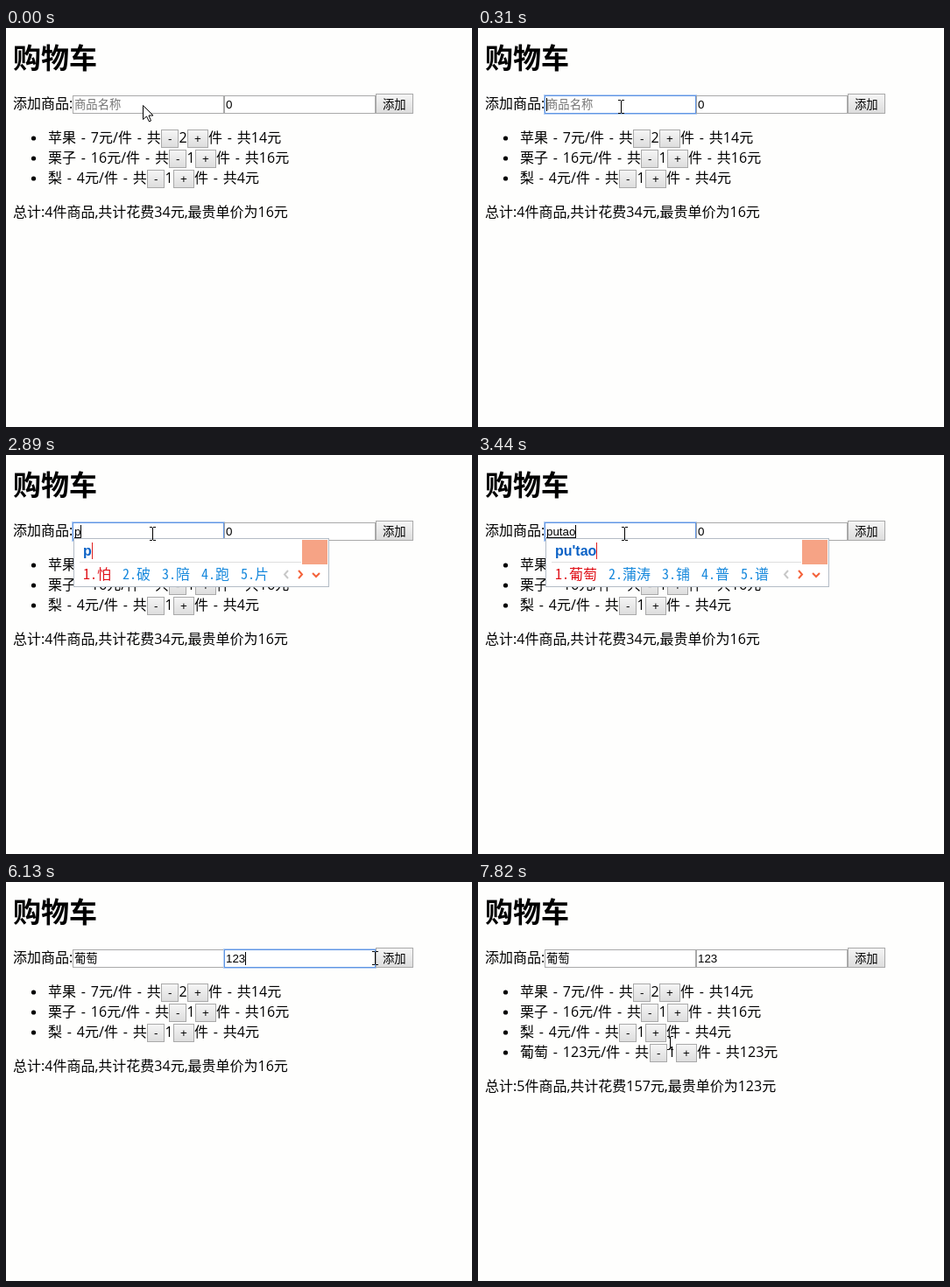
Animation, 532 px wide and 456 px high, one loop 8000 ms. Source, as an HTML page with a canvas:

```html
<!DOCTYPE html>
<html lang="zh-CN">
<head>
<meta charset="utf-8">
<title>购物车</title>
<style>
html, body { margin: 0; width: 100%; height: 100%; overflow: hidden; background: #fefefd; }
canvas { display: block; }
</style>
</head>
<body>
<canvas id="stage" width="532" height="456"></canvas>
<script>
const ctx = document.getElementById('stage').getContext('2d');
const LOOP = 8000;
const PAGE = '16px "Open Sans", "Noto Sans CJK SC", sans-serif';
const FORM = '13.333px "Liberation Sans", "Noto Sans CJK SC", sans-serif';
const MONO = '16px "Noto Sans Mono CJK SC", "Noto Sans CJK SC", monospace';

// name, price, count, x of the minus button
const items = [['苹果', 7, 2, 177], ['栗子', 16, 1, 186], ['梨', 4, 1, 161], ['葡萄', 123, 1, 196]];

// time, x, y of the pointer
const path = [
  [0, 156, 88], [29, 156, 88], [30, 163, 90], [630, 163, 90], [800, 167, 90],
  [4080, 167, 90], [4350, 212, 107], [4640, 263, 91], [4860, 265, 90],
  [5040, 265, 90], [5290, 253, 89], [5960, 253, 89], [6130, 421, 87],
  [6240, 421, 87], [6510, 443, 87], [6850, 443, 87], [7250, 378, 150],
  [7650, 273, 206], [7820, 219, 184], [8000, 219, 184]
];

// start time, typed letters, preedit, candidates, right edge of the popup
const singles = ['扑', '铺', '普', '谱', '葡'];
const pairs = ['普通', '扑通', '葡萄', '蒲团', '铺'];
const compose = [
  [2860, 'p', 'p', ['怕', '破', '陪', '跑', '片'], 369],
  [2910, 'pu', 'pu', singles, 369],
  [3170, 'put', "pu't", pairs, 442],
  [3310, 'puta', "pu'ta", pairs, 442],
  [3380, 'putao', "pu'tao", ['葡萄', '蒲涛', '铺', '普', '谱'], 401]
];

const between = (t, a, b) => t >= a && t < b;

function text(str, x, y, font = PAGE, color = '#000') {
  ctx.font = font;
  ctx.fillStyle = color;
  ctx.fillText(str, x, y);
}

function rect(x, y, w, h, color) {
  ctx.fillStyle = color;
  ctx.fillRect(x, y, w, h);
}

function frame(x, y, w, h, color) {
  ctx.strokeStyle = color;
  ctx.lineWidth = 1;
  ctx.strokeRect(x + .5, y + .5, w - 1, h - 1);
}

function line(points, color, width = 1) {
  ctx.beginPath();
  points.forEach(([x, y]) => ctx.lineTo(x, y));
  ctx.strokeStyle = color;
  ctx.lineWidth = width;
  ctx.stroke();
}

function button(label, x, y, w, h, labelX, pressed) {
  const fill = ctx.createLinearGradient(0, y, 0, y + h);
  fill.addColorStop(pressed ? 1 : 0, '#f6f6f6');
  fill.addColorStop(pressed ? 0 : 1, '#dcdcdc');
  rect(x, y, w, h, fill);
  frame(x, y, w, h, '#a9a9a9');
  text(label, labelX, y + h - 6, FORM);
}

function input(x, focused) {
  rect(x, 77, 173, 21, '#fff');
  frame(x, 77, 173, 21, focused ? '#5f95e4' : '#a9a9a9');
  if (focused) frame(x - 1, 76, 175, 23, '#b4cef3');
}

function row([name, price, count, x], i) {
  const y = 131 + i * 23;
  ctx.beginPath();
  ctx.arc(31.5, y - 5, 2.6, 0, 7);
  ctx.fillStyle = '#000';
  ctx.fill();
  ctx.wordSpacing = '1.7px';
  text(`${name} - ${price}元/件 - 共`, 48, y);
  text(count, x + 20.5, y);
  text(`件 - 共${price * count}元`, x + 54, y);
  ctx.wordSpacing = '0px';
  button('-', x, y - 15, 20, 21, x + 8);
  button('+', x + 30, y - 15, 24, 21, x + 38);
}

function popup(preedit, words, right) {
  rect(77, 95, right - 77, 56, '#fff');
  frame(77, 95, right - 77, 56, '#b4bcc6');
  rect(84, 122, right - 116, 1, '#dedede');
  text(preedit, 88, 115, 'bold 16px "Liberation Sans", sans-serif', '#0c62c6');
  rect(88 + Math.round(ctx.measureText(preedit).width), 100, 1, 19, '#e02020');
  let x = 88;
  words.forEach((word, i) => {
    text(`${i + 1}.${word}`, x, 142, MONO, i ? '#1688dc' : '#e01018');
    x += 29 + word.length * 16;
  });
  const arrow = right - 49;
  line([[arrow + 2, 132], [arrow - 2, 136.5], [arrow + 2, 141]], '#c8c8c8', 2);
  line([[arrow + 14, 132], [arrow + 18, 136.5], [arrow + 14, 141]], '#f4623a', 2);
  line([[arrow + 30, 135], [arrow + 34, 139], [arrow + 38, 135]], '#f4623a', 2);
  rect(right - 31, 97, 29, 28, '#f6a385');
}

function pointer(t) {
  const next = Math.max(1, path.findIndex(p => p[0] > t));
  const [t0, x0, y0] = path[next - 1], [t1, x1, y1] = path[next];
  const k = (t - t0) / (t1 - t0);
  const x = Math.round(x0 + (x1 - x0) * k), y = Math.round(y0 + (y1 - y0) * k);
  const overInput = between(x, 76, 422) && between(y, 77, 98);
  const overList = x < 342 && between(y, 116, 205);
  if (t >= 30 && (overInput || overList)) {
    rect(x, y - 7, 1, 14, '#000');
    for (const edge of [y - 8, y + 7]) {
      rect(x - 3, edge, 3, 1, '#000');
      rect(x + 1, edge, 3, 1, '#000');
    }
    return;
  }
  ctx.save();
  ctx.translate(x + .5, y + .5);
  ctx.beginPath();
  [[0, 0], [0, 16], [4, 12.5], [7, 18.5], [9, 17.5], [6.5, 11.5], [11.5, 11.5]]
    .forEach(([px, py]) => ctx.lineTo(px, py));
  ctx.closePath();
  ctx.fillStyle = '#fff';
  ctx.fill();
  ctx.strokeStyle = '#000';
  ctx.lineWidth = 1;
  ctx.stroke();
  ctx.restore();
}

function nameField(t, ime) {
  input(76, between(t, 310, 4640));
  const value = ime ? ime[1] : t >= 3650 ? '葡萄' : '';
  text(value || '商品名称', 78, 92, FORM, value ? '#000' : '#757575');
  const end = 78 + (value ? Math.round(ctx.measureText(value).width) : 0);
  if (ime) rect(78, 94, end - 78, 1, '#000');
  const caret = [[310, 820], [1340, 1890], [2440, 4180]].some(([a, b]) => between(t, a, b));
  if (caret) rect(end, 80, 1, 15, '#000');
}

function priceField(t) {
  input(249, between(t, 4640, 6680));
  const selected = between(t, 5180, 5790);
  const value = t < 5790 ? '0' : '123'.slice(0, 1 + Math.floor((t - 5790) / 70));
  if (selected) rect(251, 80, 7, 16, '#3297fd');
  text(value, 251, 92, FORM, selected ? '#fff' : '#000');
  if (between(t, 4640, 5100) || between(t, 5790, 6460))
    rect(251 + Math.round(ctx.measureText(value).width), 80, 1, 15, '#000');
}

function draw(t) {
  if (between(t, 200, 310)) return rect(0, 0, 532, 456, '#000002');
  rect(0, 0, 532, 456, '#fefefd');
  text('购物车', 8, 46, 'bold 32px "Noto Sans CJK SC", sans-serif');
  text('添加商品:', 8, 92);

  const ime = t < 3650 && compose.filter(step => t >= step[0]).pop();
  nameField(t, ime);
  priceField(t);
  button('添加', 422, 75, 43, 23, 430, between(t, 6680, 6860));

  const list = items.slice(0, t < 6860 ? 3 : 4);
  list.forEach(row);
  const count = list.reduce((sum, item) => sum + item[2], 0);
  const cost = list.reduce((sum, item) => sum + item[1] * item[2], 0);
  const top = Math.max(...list.map(item => item[1]));
  text(`总计:${count}件商品,共计花费${cost}元,最贵单价为${top}元`, 8, 147 + list.length * 23);

  if (ime) popup(...ime.slice(2));
  pointer(t);
}

function tick() {
  draw(performance.now() % LOOP);
  requestAnimationFrame(tick);
}
tick();
</script>
</body>
</html>
```
